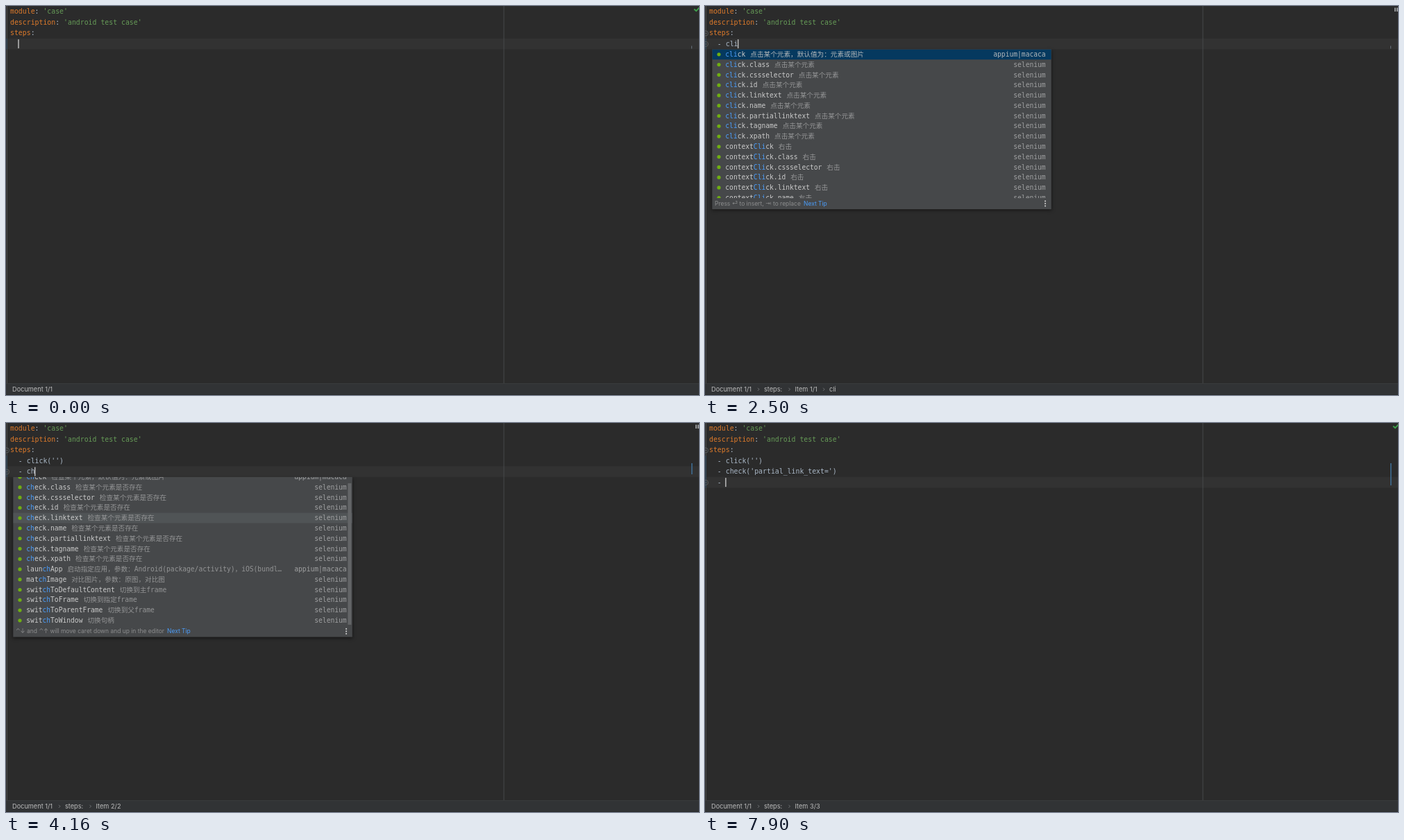
An HTML page with a canvas that plays this animation: 998 px wide and 561 px high, repeating every 8000 ms.

```html
<!DOCTYPE html>
<html lang="en">
<head>
<meta charset="utf-8">
<title>Keyword completion</title>
<style>
html, body { margin: 0; width: 100%; height: 100%; overflow: hidden; background: #2b2b2b; }
canvas { display: block; }
</style>
</head>
<body>
<canvas id="stage" width="998" height="561"></canvas>
<script>
const ctx = document.getElementById('stage').getContext('2d');
const LOOP = 8000, LINE = 15.5, ROW = 14.78, LIST_HEIGHT = 214.5;
const MONO = '"DejaVu Sans Mono", "Noto Sans CJK SC", "Noto Sans CJK", monospace';
const CODE = '9.85px ' + MONO, POPUP = '9.65px ' + MONO;
const UI = '9.2px Inter, sans-serif', TIP = '8.48px Inter, "DejaVu Sans", sans-serif';
const COLUMN = 5.93;
const KEY = '#dd7a2b', STRING = '#669b57', TEXT = '#a9b7c6', LINK = '#4b9dfa';

// Completion entries: [name, hint, library]
const locators = (name, hint, kinds) => kinds.split(' ').map(kind => [name + '.' + kind, hint]);
const KINDS = 'class cssselector id linktext name partiallinktext tagname xpath';
const BOTH = 'appium|macaca';
const clicks = [['click', '点击某个元素，默认值为：元素或图片', BOTH], ...locators('click', '点击某个元素', KINDS)];
const rightClicks = [['contextClick', '右击'], ...locators('contextClick', '右击', KINDS)];
const clickList = [
  ['clear.xpath', '指定xpath元素清除数据或状态'],
  ...clicks,
  ['close', '关闭标签页'],
  ['closeApp', '关闭指定应用，参数：Android(package)，iOS(bundleId)', BOTH],
  ...rightClicks
];
const checkList = [
  ['check', '检查某个元素，默认值为：元素或图片', BOTH],
  ...locators('check', '检查某个元素是否存在', KINDS),
  ['launchApp', '启动指定应用，参数：Android(package/activity)，iOS(bundl…', BOTH],
  ['matchImage', '对比图片，参数：原图，对比图'],
  ['switchToDefaultContent', '切换到主frame'],
  ['switchToFrame', '切换到指定frame'],
  ['switchToParentFrame', '切换到父frame'],
  ['switchToWindow', '切换句柄']
];
const insertTip = [['Press ⏎ to insert, ⇥ to replace', 14], ['Next Tip', 142]];
const moveTip = [['⌃↓ and ⌃↑ will move caret down and up in the editor', 14], ['Next Tip', 232]];

const clickPopup = { entries: clickList, prefix: 'c', selected: 1, tip: insertTip, thumb: [30.5, 19.5] };
const cliPopup = { ...clickPopup, entries: [...clicks, ...rightClicks], prefix: 'cli', selected: 0, thumb: [1, 150] };
const checkPopup = { entries: checkList, prefix: 'ch', selected: 4, scroll: ROW / 2, tip: moveTip, thumb: [9, 204] };
const focus = (popup, selected) => ({ ...popup, selected, focused: true });

const CLICK = "- click('')", CHECK = "- check('partial_link_text=')";

// Each entry changes the editor state from its time on.
const timeline = [
  [0, { items: [''], crumbs: [], icon: 'check', popup: null, caret: true }],
  [420, { items: ['-'], icon: 'eye' }],
  [630, { items: ['- '] }],
  [830, { crumbs: ['Item 1/1'], icon: 'check' }],
  [1040, { items: ['- c'], icon: 'eye' }],
  [1250, { popup: clickPopup }],
  [1460, { items: ['- cl'], popup: { ...clickPopup, prefix: 'cl' }, icon: 'pause' }],
  [1660, { items: ['- cli'], popup: cliPopup }],
  [1870, { crumbs: ['Item 1/1', 'cli'] }],
  [2500, { popup: focus(cliPopup, 0) }],
  [2710, { items: [CLICK], popup: null, icon: 'eye' }],
  [2920, { crumbs: ['Item 1/1', "click('')"], icon: 'check' }],
  [3120, { items: [CLICK, ''], crumbs: [], icon: 'eye' }],
  [3330, { items: [CLICK, '-'] }],
  [3530, { items: [CLICK, '- '], crumbs: ['Item 2/2'], icon: 'check' }],
  [3950, { items: [CLICK, '- c'], icon: 'eye' }],
  [4160, { items: [CLICK, '- ch'], popup: checkPopup, icon: 'pause' }],
  [4370, { crumbs: ['Item 2/2', 'ch'] }],
  [5000, { popup: focus(checkPopup, 4) }],
  [5210, { popup: focus(checkPopup, 5) }],
  [5410, { popup: focus(checkPopup, 6) }],
  [5820, { items: [CLICK, CHECK], popup: null, icon: 'eye' }],
  [6030, { crumbs: ['Item 2/2', "check('partial_link_text=')"], icon: 'check' }],
  [6240, { items: [CLICK, CHECK, ''], crumbs: [], icon: 'eye' }],
  [6450, { items: [CLICK, CHECK, '-'] }],
  [6650, { items: [CLICK, CHECK, '- '] }],
  [6860, { crumbs: ['Item 3/3'], icon: 'check' }],
  [7490, { caret: false }],
  [7900, { caret: true }]
];

const lineTop = row => 0.4 + LINE * row;

function box(x, y, w, h, color) {
  ctx.fillStyle = color;
  ctx.fillRect(x, y, w, h);
}

function stroke(color, width, ...points) {
  ctx.strokeStyle = color;
  ctx.lineWidth = width;
  ctx.beginPath();
  points.forEach(([x, y]) => ctx.lineTo(x, y));
  ctx.stroke();
}

function circle(x, y, radius, color, filled) {
  ctx.beginPath();
  ctx.arc(x, y, radius, 0, Math.PI * 2);
  ctx.lineWidth = 1;
  ctx.fillStyle = ctx.strokeStyle = color;
  filled ? ctx.fill() : ctx.stroke();
}

// Draws [text, color] runs one after another and returns the end position.
function write(x, y, font, ...runs) {
  ctx.font = font;
  for (const [text, color] of runs) {
    ctx.fillStyle = color;
    ctx.fillText(text, x, y);
    x += ctx.measureText(text).width;
  }
  return x;
}

function drawIcon(icon) {
  if (icon === 'check') {
    stroke('#3f9f4c', 2, [991, 4.6], [994, 7.2], [999, 1.8]);
  } else if (icon === 'eye') {
    ctx.beginPath();
    ctx.ellipse(995, 5.5, 4.2, 2.9, 0, 0, Math.PI * 2);
    ctx.strokeStyle = '#afb1b3';
    ctx.lineWidth = 1.1;
    ctx.stroke();
    circle(995, 5.5, 1.4, '#afb1b3', true);
  } else {
    box(993, 2.5, 1.6, 5.5, '#afb1b3');
    box(996, 2.5, 1.6, 5.5, '#afb1b3');
  }
}

function drawFold(row) {
  const y = lineTop(row) + 8;
  circle(1, y, 3.6, '#585b5d', false);
  stroke('#585b5d', 1, [0, y], [3, y]);
}

function drawEditor({ items, icon, caret }) {
  const last = items.length + 2;
  box(0, 0, 998, 561, '#2b2b2b');
  box(2, lineTop(last), 996, LINE, '#323232');
  box(1, 0, 1, 544, '#48494a');
  box(0.5, lineTop(3), 1.5, LINE * items.length, '#34495a');
  box(716.5, 0, 1, 544, '#46484a');
  if (items.length > 1) box(987, 58, 1.5, 16 * (items.length - 1), '#3f6f96');
  else box(987, 57.5, 1, 4, '#65707a');

  if (items[0]) {
    drawFold(2);
    drawFold(2 + items.filter(Boolean).length);
  }
  const line = (row, ...runs) => write(6, lineTop(row) + 10.9, CODE, ...runs);
  line(0, ['module', KEY], [': ', TEXT], ["'case'", STRING]);
  line(1, ['description', KEY], [': ', TEXT], ["'android test case'", STRING]);
  line(2, ['steps', KEY], [':', TEXT]);
  items.forEach((item, i) => line(i + 3, ['  ' + item, TEXT]));
  if (caret) {
    const x = 5.4 + COLUMN * (2 + items[items.length - 1].length);
    box(x, lineTop(last) + 1.2, 1.5, 13, '#bbbbbb');
  }
  drawIcon(icon);
}

function drawCrumbs(crumbs) {
  box(0, 544, 998, 1, '#393b3d');
  box(0, 545, 998, 15, '#313335');
  box(0, 560, 998, 1, '#292a2b');
  write(9, 556, UI, ['Document 1/1', '#bbbbbb']);
  let x = 85;
  ['steps:', ...crumbs].forEach((label, i) => {
    if (!crumbs.length) return;
    stroke('#77797b', 0.9, [x - 9, 550.8], [x - 7, 552.8], [x - 9, 554.8]);
    const end = write(x, 556, UI, [label, '#bbbbbb']);
    x = i ? end + 17.3 : 129.5;
  });
}

function drawEntry([name, hint, library = 'selenium'], y, prefix, active) {
  const start = name.toLowerCase().indexOf(prefix), end = start + prefix.length;
  const base = y + 10.6;
  circle(20, y + 7.4, 2.6, '#6fae12', true);
  const parts = start < 0
    ? [[name, '#cacaca']]
    : [[name.slice(0, start), '#cacaca'], [name.slice(start, end), LINK], [name.slice(end), '#cacaca']];
  const nameEnd = write(29.3, base, POPUP, ...parts);
  write(nameEnd + 7, base, POPUP, [hint, active ? '#b4b8bb' : '#949596']);
  ctx.textAlign = 'right';
  write(490.6, base, POPUP, [library, active ? '#b4b8bb' : '#a0a1a2']);
  ctx.textAlign = 'left';
}

function drawPopup(popup, row) {
  const { entries, prefix, selected, focused, scroll = 0, tip, thumb } = popup;
  const top = lineTop(row) + LINE;
  ctx.save();
  ctx.shadowColor = 'rgba(0,0,0,.5)';
  ctx.shadowBlur = 5;
  ctx.shadowOffsetY = 2;
  box(10.3, top, 488.4, 230.7, '#46484a');
  ctx.restore();

  ctx.save();
  ctx.beginPath();
  ctx.rect(10.3, top, 488.4, LIST_HEIGHT);
  ctx.clip();
  box(10.3, top + selected * ROW - scroll, 488.4, ROW, focused ? '#05395f' : '#505456');
  entries.slice(0, 15).forEach((entry, i) =>
    drawEntry(entry, top + i * ROW - scroll, prefix, focused && i === selected));
  if (!focused) box(492.3, top + thumb[0], 5, thumb[1], '#636567');
  ctx.restore();

  const base = top + LIST_HEIGHT + 11;
  tip.forEach(([text, x], i) => write(x, base, TIP, [text, i ? LINK : '#8c8d8e']));
  for (const dy of [-6.5, -3, 0.5]) circle(490, base + dy, 1.1, '#c0c0c0', true);
}

function render() {
  const time = performance.now() % LOOP;
  const state = {};
  for (const [start, change] of timeline) if (start <= time) Object.assign(state, change);
  drawEditor(state);
  drawCrumbs(state.crumbs);
  if (state.popup) drawPopup(state.popup, state.items.length + 2);
  requestAnimationFrame(render);
}
render();
</script>
</body>
</html>
```
